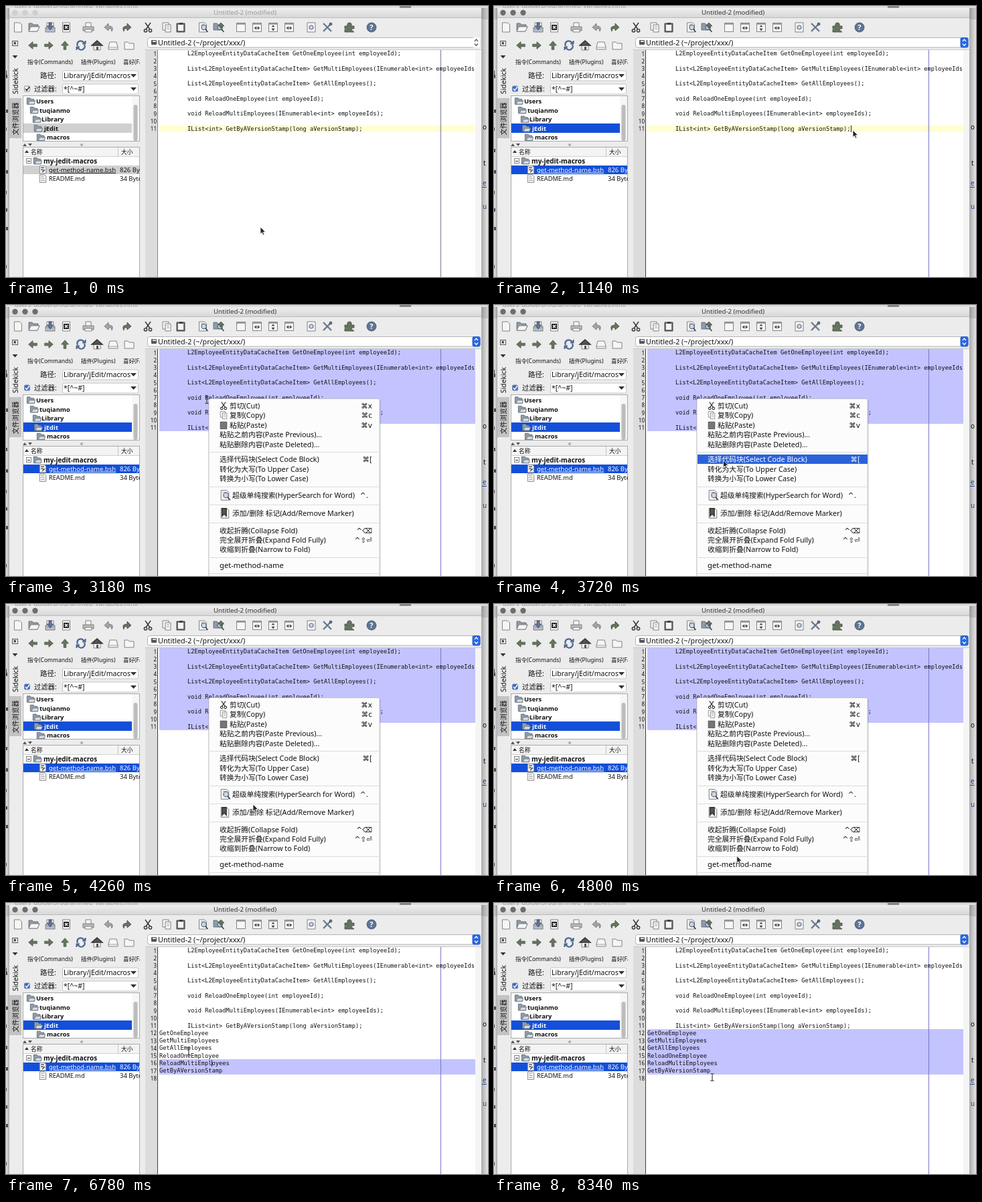
Animation of 720x406 px, one loop 8.58 s. Source, as an HTML page:

```html
<!DOCTYPE html>
<html lang="zh-CN">
<head>
<meta charset="utf-8">
<title>Editor macro</title>
<style>
  html, body { margin: 0; width: 100%; height: 100%; overflow: hidden; background: #fff; }
  svg {
    display: block; width: 720px; height: 406px;
    font-family: "Noto Sans", "Noto Sans CJK SC", "Noto Sans CJK", sans-serif;
    --sel: #d0d0d0; --sel-text: #111; --title: #999; --light: #cfcfcf;
    --guide: #77779f; --edge: #8d7f97; --check: #fff; --tick: #222; --step: #fff; --step-mark: #555;
  }
  svg.active {
    --sel: #134fd8; --sel-text: #fff; --title: #333; --light: #6e6e6e;
    --guide: #7777cc; --edge: #3d2a90; --check: #2f6be4; --tick: #fff; --step: #2a66dc; --step-mark: #fff;
  }
  rect { shape-rendering: crispEdges; }
  rect[rx] { shape-rendering: auto; }
  text { fill: #111; white-space: pre; }
  .mono { font-family: "DejaVu Sans Mono", monospace; font-size: 8.7px; }
  .keys { font-family: "DejaVu Sans", sans-serif; }
  .page { fill: #f6f6f6; stroke: #777; stroke-width: .9; }
  .ink { fill: none; stroke: #333; stroke-width: 1.4; }
  .thin { fill: none; stroke: #888; stroke-width: .8; }
  .lens { fill: #c3cede; fill-opacity: .8; stroke: #5c6b85; stroke-width: 1.2; }
  .folder { fill: #8e9caa; stroke: #56616d; stroke-width: .8; }
  .green { fill: #66755f; stroke: #3c4a38; stroke-width: .8; }
  .blue { fill: #5f7596; stroke: #3a4a68; stroke-width: .8; }
  .item rect { fill: none; }
  .item.on rect { fill: #2a62d9; }
  .item.on text { fill: #fff; }
</style>
</head>
<body>
<svg id="stage" viewBox="0 0 720 406"></svg>
<script>
const LOOP = 8580, STEP = 60, ROW = 11.25, TOP = 65.5, LEFT = 229, RIGHT = 701;

const esc = s => s.replace(/&/g, '&amp;').replace(/</g, '&lt;');
const text = (x, y, s, size, extra = '') => `<text x="${x}" y="${y}" font-size="${size}" ${extra}>${esc(s)}</text>`;
const rect = (x, y, w, h, fill, extra = '') => `<rect x="${x}" y="${y}" width="${w}" height="${h}" fill="${fill}" ${extra}/>`;
const path = (d, cls, extra = '') => `<path d="${d}" class="${cls}" ${extra}/>`;
const ring = (x, y, r, cls) => `<circle cx="${x}" cy="${y}" r="${r}" class="${cls}"/>`;

const sheet = path('M-5.5-7H2.5L5.5-4V7H-5.5Z', 'page');
const frame = path('M-6.5-6.5H6.5V6.5H-6.5Z', 'page') + rect(-6, -6, 12, 2, '#9aa3b0');
const lens = ring(1.5, 0, 3.6, 'lens') + path('M4 3L7.5 7', 'ink');
const block = 'M-2-7H2V0H6L0 7L-6 0H-2Z';
const curl = 'M4 6Q8-2-1-2V-6L-7 0L-1 5V2Q4 1 4 6Z';
const icons = {
  sheet,
  open: path('M-8 6V-6H-3L-1-4H6V-1H8L5 6Z', 'folder') + path('M-8 6L-5-1H8L5 6Z', 'page'),
  save: path('M-7 0H7V7H-7Z', 'page', 'style="fill:#b8bec8"') + path('M-5-7H5V2H-5Z', 'page') + path('M-2-7H2V-2H5L0 4L-5-2H-2Z', 'blue'),
  close: path('M-5.5-7H5.5V7H-5.5Z', 'page') + rect(-4, -4, 8, 8, '#222') + path('M-2-2L2 2M2-2L-2 2', '', 'stroke="#fff" stroke-width="1.5"'),
  print: path('M-4-7H4V0H-4Z', 'page') + path('M-8-1H8V5H-8Z', 'page', 'style="fill:#bbb"') + path('M-5 3H5V7H-5Z', 'page'),
  undo: path(curl, 'page', 'style="fill:#a4a4a4"'),
  redo: path(curl, 'green', 'transform="scale(-1 1)"'),
  cut: path('M-4-7L3 3M4-7L-3 3', 'ink') + ring(-3.5, 4.8, 2.2, 'ink') + ring(3.5, 4.8, 2.2, 'ink'),
  copy: path('M-6-7H3V4H-6Z', 'page') + path('M-2-4H6V7H-2Z', 'page') + path('M0-1H4M0 2H4', 'thin'),
  paste: path('M-6-6H6V7H-6Z', 'page', 'style="fill:#777;stroke:#333"') + rect(-4, -4, 8, 9, '#f5f5f5') + rect(-2.5, -7.5, 5, 3, '#444'),
  find: sheet + path('M-3-4H2', 'thin') + lens,
  findDir: path('M-8 4V-6H-3L-1-4H5V4Z', 'folder') + lens + path('M3-7L8-2H5V1H2V-2H-1Z', 'green'),
  win: frame,
  split: frame + path('M-4 1L-1-1V3ZM4 1L1-1V3Z', 'ink', 'style="stroke-width:.6;fill:#555"'),
  stack: frame + path('M0-3L2-1H-2ZM0 5L2 2H-2Z', 'ink', 'style="stroke-width:.6;fill:#555"'),
  book: path('M-6-7H6V7H-6Z', 'page') + ring(0, 0, 3, 'lens'),
  tools: path('M-6 6L5-5M-6-6L6 6', 'ink', 'style="stroke-width:2.3;stroke:#687788"') + ring(5, -5, 2, 'blue'),
  plug: path('M-7-2H-3Q-4-7 0-7Q4-7 3-2H7V2Q3 1 3 4L7 7H-7V3Q-3 4-3 1L-7 2Z', 'green'),
  help: ring(0, 0, 7, 'blue') + text(-2.8, 4, '?', 11, 'font-weight="700" style="fill:#fff"'),
  arrow: path(block, 'green'),
  reload: path('M-5 1A5 5 0 0 1 4-4M5-1A5 5 0 0 1-4 4', 'ink', 'style="stroke:#4b689a;stroke-width:2.4"') + path('M2-2H7V-7ZM-2 2H-7V7Z', 'blue'),
  home: path('M-5 0V7H5V0', 'page') + path('M-8 0L0-7L8 0Z', 'ink', 'style="fill:#555"') + rect(-1.5, 2, 3, 5, '#555'),
  drive: path('M-7 3L-5-5H5L7 3V6H-7Z', 'page') + path('M-7 3H7', 'thin'),
  dir: path('M-7 6V-5H-2L0-3H7V6Z', 'page'),
  folder: path('M-6 5V-5H-1L1-3H5V-1H6V5Z', 'folder') + path('M-4 5L-2 0H7L5 5Z', 'page', 'style="fill:#d3dde6"'),
  doc: path('M-5-6H3L5-4V6H-5Z', 'page') + path('M-3-3H2M-3 0H3M-3 3H3', 'thin'),
  script: path('M-5-6H3L5-4V6H-5Z', 'page') + path('M-3-3H2M-3 0H1M-1 4L3 0', 'ink'),
  mark: sheet + path('M-4-7H2V4L-1 1L-4 4Z', 'ink', 'style="fill:#555"')
};
const icon = (name, x, y, scale = 1, turn = 0) =>
  `<g transform="translate(${x} ${y}) rotate(${turn}) scale(${scale})">${icons[name]}</g>`;

const code = {
  1: 'L2EmployeeEntityDataCacheItem GetOneEmployee(int employeeId);',
  3: 'List<L2EmployeeEntityDataCacheItem> GetMultiEmployees(IEnumerable<int> employeeIds);',
  5: 'List<L2EmployeeEntityDataCacheItem> GetAllEmployees();',
  7: 'void ReloadOneEmployee(int employeeId);',
  9: 'void ReloadMultiEmployees(IEnumerable<int> employeeIds);',
  11: 'IList<int> GetByAVersionStamp(long aVersionStamp);'
};
const names = ['GetOneEmployee', 'GetMultiEmployees', 'GetAllEmployees',
  'ReloadOneEmployee', 'ReloadMultiEmployees', 'GetByAVersionStamp'];
const lineTop = n => TOP + (n - 1) * ROW;
const codeLine = (x, n, s) => text(x, lineTop(n) + 8.6, s, 8.7, 'class="mono"');
const number = n => text(225, lineTop(n) + 9, String(n), 8, 'text-anchor="end" font-weight="500"');
const range = (a, b) => Array.from({ length: b - a + 1 }, (_, i) => a + i);

// centre y, label, shortcut, icon, label x, half height
const menu = [
  [151, '剪切(Cut)', '⌘x', 'cut', 334], [165, '复制(Copy)', '⌘c', 'copy', 334],
  [180, '粘贴(Paste)', '⌘v', 'paste', 334],
  [194, '粘贴之前内容(Paste Previous)...'], [209, '粘贴删除内容(Paste Deleted)...'],
  [231, '选择代码块(Select Code Block)', '⌘['], [245.5, '转化为大写(To Upper Case)'],
  [260, '转换为小写(To Lower Case)'],
  [285, '超级单纯搜索(HyperSearch for Word)', '^.', 'find', 338, 11],
  [312, '添加/删除 标记(Add/Remove Marker)', '', 'mark', 338, 11],
  [337.5, '收起折腾(Collapse Fold)', '^⌫'], [352, '完全展开折叠(Expand Fold Fully)', '^⇧⏎'],
  [366, '收缩到折叠(Narrow to Fold)'], [389.5, 'get-method-name']
];

function backdrop() {
  const bits = [97, 103, 155, 182, 214, 246, 277, 303, 331, 388];
  return rect(0, 0, 720, 406, '#f4f4f4') + rect(0, 0, 720, 20, '#dcdcdc') +
    text(197, 3, 'users_guide/programmed_variables.html', 9.5, 'text-anchor="end" style="fill:#999"') +
    rect(588, 0, 17, 3, '#888') +
    bits.map((y, i) => rect(0, y, i % 3 + 1, i ? 5 : 9, '#555')).join('') +
    text(712, 185, 'o', 10) + text(712, 269, 'e', 10, 'style="fill:#2754b8"') + rect(711, 271, 7, 1, '#2754b8') +
    text(712, 304, 'u', 10, 'style="fill:#2754b8"') + text(713, 239, 't', 10) +
    rect(0, 3, 5, 403, 'url(#shade)', 'transform="translate(5 0) scale(-1 1)"') + rect(710, 3, 10, 403, 'url(#shade)');
}

function chrome() {
  const bar = [['sheet', 18], ['open', 42], ['save', 66], ['close', 90], ['print', 123], ['undo', 154],
    ['redo', 180], ['cut', 212], ['copy', 240], ['paste', 261], ['find', 294], ['findDir', 318], ['win', 351],
    ['split', 375], ['stack', 399], ['split', 423], ['book', 456], ['tools', 480], ['plug', 513], ['help', 546]];
  return rect(5, 3, 705, 403, '#ececec') + rect(5, 3, 705, 15, 'url(#bar)') + rect(5, 17, 705, 1, '#bbb') +
    [13.5, 28.5, 43.5].map(x => `<circle cx="${x}" cy="10" r="4.2" style="fill:var(--light)"/>`).join('') +
    text(357, 13.2, 'Untitled-2 (modified)', 9.7, 'text-anchor="middle" style="fill:var(--title)"') +
    bar.map(([n, x]) => icon(n, x, 32)).join('');
}

function dock() {
  const combo = (y, s) => rect(84.5, y, 113, 15, '#fff', 'rx="2" stroke="#c4c4c4"') + text(86, y + 11.2, s, 10.5) +
    `<path d="M186 ${y + 5}H195L190.5 ${y + 10}Z" fill="#333"/>`;
  const tree = [['Users', 37, 45], ['tuqianmo', 42, 50], ['Library', 46, 53], ['jEdit', 48, 57], ['macros', 52, 61]];
  const nav = [[40, 90], [64, -90], [88, 180]];
  return rect(5, 138, 18, 60, '#c3c3c3') +
    rect(9.5, 52, 7.5, 7.5, '#fff', 'stroke="#555"') + path('M11.5 54L15 57.5M15 54L11.5 57.5', 'ink') +
    '<path d="M9.5 74H17.5L13.5 78.5Z" fill="#333"/>' +
    text(0, 0, 'Sidekick', 10.3, 'transform="translate(18 132) rotate(-90)"') +
    text(0, 0, '文件浏览器', 9.8, 'transform="translate(18 193.5) rotate(-90)"') +
    '<g clip-path="url(#dock)">' +
    nav.map(([x, a]) => icon('arrow', x, 59, .9, a)).join('') +
    ['reload', 'home', 'drive', 'dir'].map((n, i) => icon(n, 112 + 24 * i, 59)).join('') +
    text(32, 87, '指令(Commands)', 8.5) + text(112, 87, '插件(Plugins)', 8.5) + text(175, 87, '喜好(Favorites)', 8.5) +
    text(51, 108.3, '路径:', 10.5) + combo(97, 'Library/jEdit/macros') +
    rect(27.5, 120, 8, 8, 'none', 'rx="1.5" stroke="#888" style="fill:var(--check)"') +
    '<path d="M29 124L31 126.5L35 121" fill="none" style="stroke:var(--tick)" stroke-width="1.4"/>' +
    text(42, 128, '过滤器:', 10.3) + combo(117, '*[^~#]') +
    rect(25.5, 134.5, 174, 68, '#fff', 'stroke="#aaa"') +
    rect(26, 176, 162, 14, 'none', 'style="fill:var(--sel)"') +
    tree.map(([s, ix, x], i) => icon('folder', ix, 142.5 + 13.6 * i, .95) +
      text(x, 146 + 13.6 * i, s, 9.4, `font-weight="700" ${i === 3 ? 'style="fill:var(--sel-text)"' : ''}`)).join('') +
    rect(188, 135, 11, 67, '#f6f6f6') + rect(190.5, 148, 6, 54, '#bcbcbc', 'rx="3"') +
    '<path d="M25 210L28 206L31 210ZM33 206H39L36 210Z" fill="#555"/><circle cx="113" cy="208" r="2" fill="#aaa"/>' +
    rect(25.5, 211.5, 174, 195, '#fff', 'stroke="#aaa"') + rect(26, 212, 173, 13, '#f4f4f4') +
    rect(26, 225, 173, 1, '#d0d0d0') + rect(167, 212, 1, 13, '#c4c4c4') +
    '<path d="M28 220L31 216L34 220Z" fill="#333"/>' + text(37, 221.5, '名称', 8.7) + text(172, 221.5, '大小', 8.7) +
    rect(30.5, 228.5, 7, 7, '#fff', 'stroke="#666" stroke-width=".8"') + rect(32, 231.6, 4, 1, '#222') +
    icon('folder', 47, 232, .95) + text(56, 235.6, 'my-jedit-macros', 9.9, 'font-weight="700"') +
    rect(26, 239, 173, 13, 'none', 'style="fill:var(--sel)"') + icon('script', 55, 245.3, .95) + icon('doc', 55, 258.7, .95) +
    text(64, 248.8, 'get-method-name.bsh', 9.5, 'text-decoration="underline" style="fill:var(--sel-text)"') +
    text(170, 248.8, '826 Bytes', 9.5, 'style="fill:var(--sel-text)"') +
    text(64, 262.2, 'README.md', 9.2) + text(170, 262.2, '34 Bytes', 9.5) + '</g>';
}

function editor() {
  return rect(211.5, 47.5, 497, 14.5, '#fff', 'rx="3" stroke="#b4b4b4"') +
    rect(696.5, 47, 12, 15.5, 'none', 'rx="3" style="fill:var(--step)"') +
    '<path d="M700 53L702.5 50L705 53M700 56.5L702.5 59.5L705 56.5" fill="none" style="stroke:var(--step-mark)" stroke-width="1.2"/>' +
    rect(217, 51, 8, 7, '#555', 'rx="1"') + rect(218.5, 52, 5, 2, '#ddd') + text(227, 58.5, 'Untitled-2 (~/project/xxx/)', 10.8) +
    rect(208, 65, 19, 341, '#dcdcdc') + rect(227, 65, 474, 341, '#fff') + rect(701, 65, 9, 341, '#f5f5f5') +
    rect(208, 65, 502, 1, '#c8c8c8') + '<path id="band" shape-rendering="crispEdges"/>' +
    rect(226, 66, 1, 340, 'none', 'style="fill:var(--edge)"') +
    rect(649, 66, 1, 340, 'none', 'style="fill:var(--guide)"') +
    range(1, 11).map(number).join('') +
    '<g clip-path="url(#code)">' + Object.keys(code).map(n => codeLine(271, +n, code[n])).join('') + '</g>' +
    '<g id="added">' + range(12, 18).map(number).join('') +
    names.map((s, i) => codeLine(LEFT, 12 + i, s)).join('') + '</g>' +
    rect(0, 0, 1, 10.5, '#222', 'id="caret"');
}

function popup() {
  const rows = menu.map(([y, label, keys, pic, x = 319, half = 7.2]) =>
    `<g class="item">${rect(303.5, y - half, 254, half * 2, '')}` +
    (pic ? icon(pic, x === 338 ? 327 : 325, y, x === 338 ? 1.05 : .8) : '') +
    text(x, y + 4, label, label === 'get-method-name' ? 11.2 : 10.75) +
    (keys ? text(keys === '^.' ? 541 : 547, y + 4, keys, 10.5, 'class="keys" text-anchor="end"') : '') + '</g>').join('');
  return '<g id="menu">' + rect(302, 142, 258, 264, '#000', 'opacity=".1" rx="3"') +
    rect(303, 140.5, 255, 270, '#fcfcfc', 'rx="2" stroke="#bbb" stroke-width=".8"') +
    [220, 272, 298.5, 325.5, 378, 402].map(y => rect(303.5, y, 254, 1, '#dcdcdc')).join('') + rows + '</g>';
}

const stage = document.getElementById('stage');
stage.innerHTML = `<defs>
  <linearGradient id="bar" x2="0" y2="1"><stop stop-color="#eee"/><stop offset="1" stop-color="#d6d6d6"/></linearGradient>
  <linearGradient id="shade"><stop stop-opacity=".3"/><stop offset="1" stop-opacity=".06"/></linearGradient>
  <clipPath id="dock"><rect width="200" height="406"/></clipPath>
  <clipPath id="code"><rect x="227" y="60" width="474" height="346"/></clipPath></defs>` +
  backdrop() + chrome() + dock() + editor() + popup() +
  `<g id="pointer"><path d="M0 0V10.5L2.4 8.4L4.2 12.3L6 11.5L4.2 7.7H7.6Z" fill="#222" stroke="#fff" stroke-width=".8"/></g>
   <g id="beam"><path d="M-2.5-5.5Q0-5.5 0-4V4Q0 5.5-2.5 5.5M2.5-5.5Q0-5.5 0-4M0 4Q0 5.5 2.5 5.5" fill="none" stroke="#333" stroke-width="1.1"/></g>`;

const [band, added, caret, popupEl, pointer, beam] =
  ['band', 'added', 'caret', 'menu', 'pointer', 'beam'].map(id => document.getElementById(id));
const items = [...document.querySelectorAll('.item')];

// time, x, y
const route = [[0, 380, 331], [120, 382, 313], [420, 382, 313], [960, 536, 186], [1140, 536, 186], [1500, 440, 176],
  [1800, 318, 126], [1860, 308.5, 110], [1980, 290, 92], [2340, 232, 69], [2820, 300, 142], [3180, 300, 142],
  [4020, 366, 283], [4080, 366, 283], [4260, 369, 300], [4860, 362, 386], [5640, 362, 386], [5940, 300, 312],
  [6120, 300, 312], [6420, 234, 262], [6540, 234, 262], [6720, 307, 240], [6780, 273, 222], [7020, 240, 204],
  [7140, 240, 204], [7500, 320, 250], [7800, 320, 250], [7980, 326, 261], [LOOP, 326, 261]];
// time, first selected line (0 for none), caret x
const picks = [[0, 0, 0], [1320, 11, 480], [1560, 10, LEFT], [1620, 9, 395], [1680, 8, LEFT],
  [1740, 7, 340], [1800, 6, LEFT], [1920, 5, 300], [2100, 4, LEFT], [2160, 3, 260], [2220, 2, LEFT], [2280, 1, LEFT],
  [6480, 0, 0], [6600, 17, 300], [6780, 16, 307], [6840, 15, 270], [6900, 14, 260], [6960, 13, 245], [7140, 12, LEFT]];

const between = (t, a, b) => t >= a && t < b;
const show = (el, on) => el.setAttribute('visibility', on ? 'visible' : 'hidden');

function mouse(t) {
  const i = route.findIndex(k => k[0] > t);
  const [a, b] = [route[i - 1], route[i]];
  const u = (t - a[0]) / (b[0] - a[0]);
  return [a[1] + (b[1] - a[1]) * u, a[2] + (b[2] - a[2]) * u];
}

function bandPath(first, last, end) {
  return range(first, last).map(n =>
    `M${LEFT} ${lineTop(n)}H${n === last ? end : RIGHT}v${ROW}H${LEFT}Z`).join('');
}

function draw(t) {
  const [x, y] = mouse(t);
  const [, first, column] = picks.filter(k => k[0] <= t).pop();
  const long = t >= 5220;
  const bare = long ? 18 : 11;
  stage.classList.toggle('active', t >= 1140);
  show(added, long);
  band.setAttribute('fill', first ? '#c3c3ff' : '#ffffd2');
  band.setAttribute('d', first ? bandPath(first, long ? 17 : 11, long ? RIGHT : 533) : bandPath(bare, bare, RIGHT));

  caret.setAttribute('x', first ? column : long ? LEFT : 533);
  caret.setAttribute('y', lineTop(first || bare) + .5);
  show(caret, between(t, 1140, 2460) || between(t, 5220, 5940) || between(t, 6480, 7320));

  const open = between(t, 3180, 5160);
  show(popupEl, open);
  items.forEach((el, i) => {
    const [cy, , , , , half = 7.2] = menu[i];
    el.classList.toggle('on', open && t > 3180 && Math.abs(y - cy) < half);
  });

  const arrow = t < 2040 || between(t, 3240, 5160);
  show(pointer, arrow);
  show(beam, !arrow);
  (arrow ? pointer : beam).setAttribute('transform', `translate(${x} ${y})`);
}

const start = performance.now();
function tick() {
  const t = (performance.now() - start) % LOOP;
  draw(Math.floor(t / STEP) * STEP);
  requestAnimationFrame(tick);
}
tick();
</script>
</body>
</html>
```
